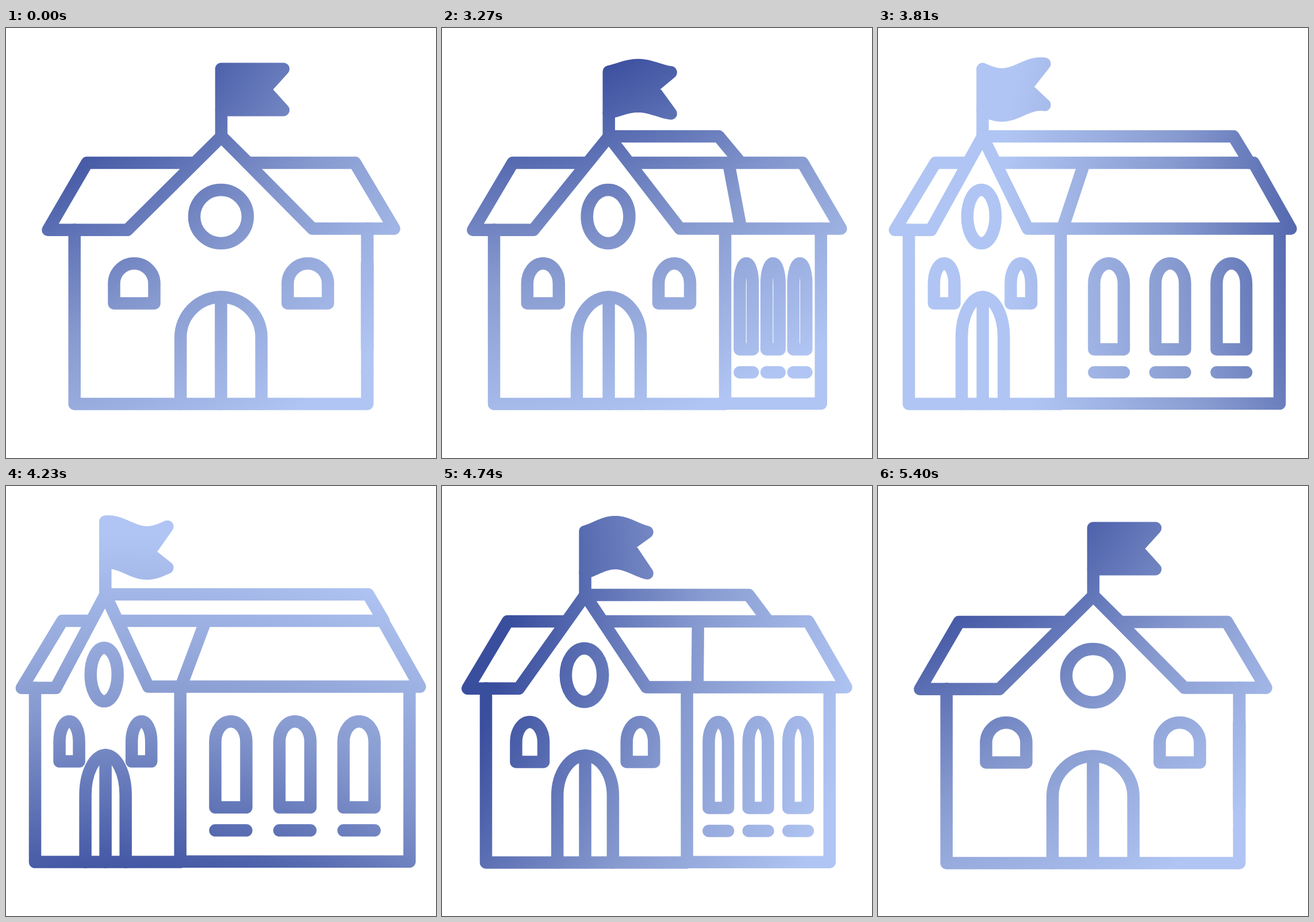
Animation of 748 by 748 pixels, one loop 5430 ms. Source, as an HTML page with a canvas:

```html
<!DOCTYPE html>
<html lang="en">
<head>
<meta charset="utf-8">
<title>School building</title>
<style>
  html, body { margin: 0; width: 100%; height: 100%; overflow: hidden; background: #fff; }
  canvas { display: block; }
</style>
</head>
<body>
<canvas id="stage" width="748" height="748"></canvas>
<script>
const ctx = document.getElementById('stage').getContext('2d');
const LOOP = 5430, STEP = 30, START = 3000, TURNED = 4200, END = 5400;

const clamp = v => Math.min(1, Math.max(0, v));
const mix = (a, b, k) => a + (b - a) * k;
const span = (t, from, to) => clamp((t - from) / (to - from));

// Cubic Bezier easing with control points (x1, 0) and (x2, 1)
function ease(x, x1, x2) {
  if (x <= 0 || x >= 1) return clamp(x);
  let lo = 0, hi = 1;
  for (let i = 0; i < 30; i++) {
    const u = (lo + hi) / 2, v = 1 - u;
    if (3 * v * v * u * x1 + 3 * v * u * u * x2 + u ** 3 < x) lo = u; else hi = u;
  }
  return lo * lo * (3 - 2 * lo);
}

function line(...pts) {
  ctx.beginPath();
  for (const [x, y] of pts) ctx.lineTo(x, y);
  ctx.stroke();
}

// Arched opening; its rounded top is half an ellipse
function arch(cx, halfWidth, top, rise, bottom, closed = true) {
  ctx.beginPath();
  ctx.moveTo(cx - halfWidth, bottom);
  ctx.ellipse(cx, top + rise, halfWidth, rise, 0, Math.PI, 2 * Math.PI);
  ctx.lineTo(cx + halfWidth, bottom);
  if (closed) ctx.closePath();
  ctx.stroke();
}

function paint(t) {
  const angle = (47 + 360 * ease(span(t, START, END), 0.33, 0.44)) * Math.PI / 180;
  const gx = 470 - 970 * Math.cos(angle), gy = 374 - 970 * Math.sin(angle);
  const shade = ctx.createRadialGradient(gx, gy, 600, gx, gy, 1220);
  shade.addColorStop(0, '#3a4e9e');
  shade.addColorStop(0.53, '#889bd0');
  shade.addColorStop(1, '#b0c5f3');
  ctx.strokeStyle = ctx.fillStyle = shade;
  ctx.lineWidth = 21.5;
  ctx.lineCap = ctx.lineJoin = 'round';
}

function drawFlag(x, t) {
  const swell = ease(Math.min(span(t, START, 3420), 1 - span(t, 4930, 5330)), 0.33, 0.67);
  const crest = 0.00086 * (t - 3450);
  const point = (u, y) =>
    [x + 108 * u, y + 9.5 * swell * Math.cos(2 * Math.PI * (u - crest) / 1.25)];
  const edge = [];
  for (let i = 0; i <= 24; i++) edge.push(i / 24);
  const outline = [
    ...edge.map(u => point(u, 71.2)),
    point(0.7, 107),
    ...edge.reverse().map(u => point(u, 142.8))
  ];
  ctx.beginPath();
  for (const [px, py] of outline) ctx.lineTo(px, py);
  ctx.closePath();
  ctx.fill();
  ctx.stroke();
  line([x, 189], outline[outline.length - 1]);
}

function drawSchool(p, t) {
  const at = (front, turned) => mix(front, turned, p);
  const left = at(119.2, 50.5), corner = at(628.5, 303), right = at(628.5, 702);
  const apex = at(374.5, 172.7), footL = at(211, 86.5), footR = at(533, 247.4);
  const eaveL = at(73, 27.4), eaveR = at(675, 720);
  const ridgeL = at(141, 98), ridgeR = at(607, 655.5);
  const ridgeY = 234.5, eaveY = 349;

  // Walls
  line([left, 351], [left, 654], [corner, 654], [corner, eaveY]);
  line([corner, 653.3], [right, 653.3], [right, eaveY]);

  // Roofs
  line([mix(apex, footL, 0.28), ridgeY], [ridgeL, ridgeY], [eaveL, 351.3],
       [footL, 351.3], [apex, 189], [footR, eaveY], [eaveR, eaveY],
       [ridgeR, ridgeY], [mix(apex, footR, 0.286), ridgeY]);
  line([at(607, 347), ridgeY], [at(675, 304), eaveY]);
  line([apex, 188.5], [at(374.5, 630), 188.5], [at(421, 657), ridgeY]);

  // Front openings
  ctx.beginPath();
  ctx.ellipse(at(374, 170.6), 328, at(46.5, 23.5), 46.5, 0, 0, 2 * Math.PI);
  ctx.stroke();
  for (const cx of [at(223, 110), at(525, 235.5)]) arch(cx, at(35, 17), 409.5, 35, 479);
  const door = at(374, 173);
  arch(door, at(70.3, 35), 468, 70, 654, false);
  line([door, 468], [door, 654]);

  // Side windows and sills
  for (let i = -1; i <= 1; i++) {
    const cx = (corner + right) / 2 + i * 111.6 * p, half = 27 * p;
    arch(cx, half, 409.5, 35, 559);
    line([cx - half, 599], [cx + half, 599]);
  }
  drawFlag(apex, t);
}

function frame(now) {
  const t = Math.floor(now % LOOP / STEP) * STEP;
  const turn = t < TURNED
    ? ease(span(t, START, TURNED), 0.333, 0)
    : 1 - ease(span(t, TURNED, END), 0.6, 0.4);
  ctx.clearRect(0, 0, 748, 748);
  paint(t);
  ctx.save();
  ctx.translate(0, 2 * span(t, TURNED, END));
  drawSchool(turn, t);
  ctx.restore();
}

const begin = performance.now();
function tick() {
  frame(performance.now() - begin);
  requestAnimationFrame(tick);
}
tick();
</script>
</body>
</html>
```
